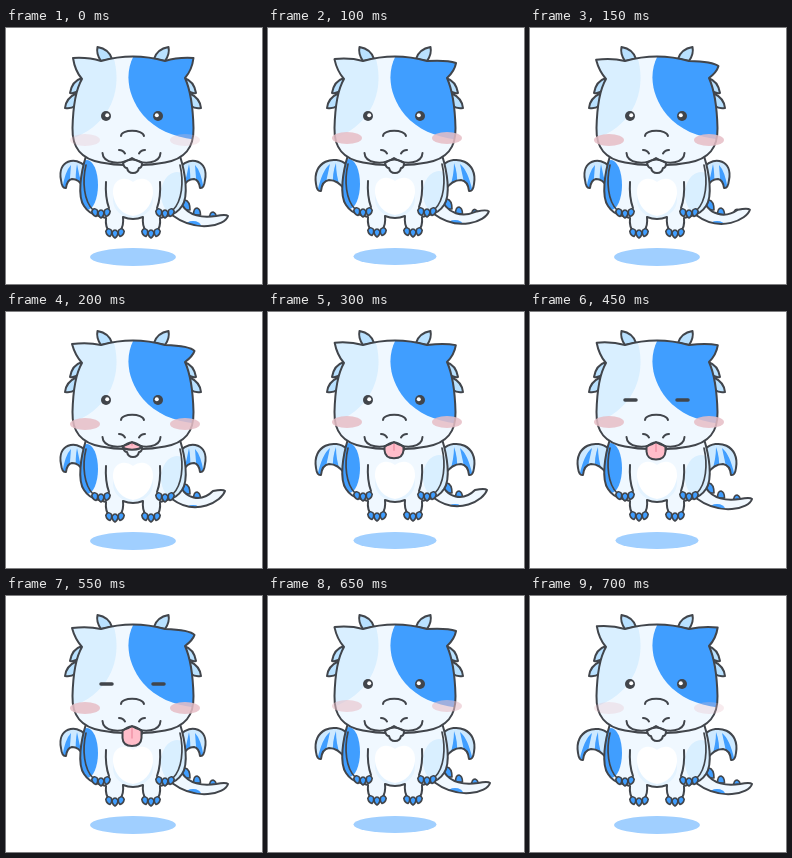
Animation of 256x256 px, one loop 0.75 s. Source, as an HTML page with a canvas:

```html
<!DOCTYPE html>
<html lang="en">
<head>
<meta charset="utf-8">
<style>
html, body { margin: 0; width: 100%; height: 100%; overflow: hidden; background: #fff; }
canvas { display: block; width: 256px; height: 256px; }
</style>
</head>
<body>
<canvas id="stage"></canvas>
<script>
const canvas = document.getElementById('stage');
const ctx = canvas.getContext('2d');
const ratio = window.devicePixelRatio || 1;
canvas.width = canvas.height = 256 * ratio;

const INK = '#41454b', BLUE = '#409eff', SKY = '#b9e1ff', MEMBRANE = '#cde9ff';
const PALE = '#d9efff', SKIN = '#f0f8ff', BLUSH = '#e6bdc6';
const STEP = 50, STEPS = 15, MIDDLE = 127;
const FLAPS = 4, NODS = 2;

// Each track is a list of [step, value] pairs joined by straight lines.
const tracks = {
  tail: [[0, 0], [2, .4], [4, 1], [6, 1], [8, 0], [15, 0]],
  tongue: [[0, 0], [3, 0], [4, .35], [6, .8], [8, .8], [11, 1], [13, 0], [15, 0]],
  blush: [[0, .35], [2, 1], [12, 1], [14, .35], [15, .35]]
};

const mix = (a, b, k) => a + (b - a) * k;

function sample(track, step) {
  const i = track.findIndex(key => key[0] > step);
  const [s0, v0] = track[i - 1], [s1, v1] = track[i];
  return mix(v0, v1, (step - s0) / (s1 - s0));
}

function poseAt(step) {
  const pose = {};
  for (const name in tracks) pose[name] = sample(tracks[name], step);
  const flap = step * FLAPS / STEPS % 1;
  pose.wing = flap > .1 && flap < .8 ? 1 : 0;
  pose.lift = flap > .1 && flap < .68 ? 1 : 0;
  pose.ear = (1 - Math.cos(2 * Math.PI * NODS * step / STEPS)) / 2;
  pose.closed = step >= 8 && step <= 12;
  return pose;
}

function shape(d, fill, line, width = 2) {
  const path = new Path2D(d);
  if (fill) { ctx.fillStyle = fill; ctx.fill(path); }
  if (line) { ctx.strokeStyle = line; ctx.lineWidth = width; ctx.stroke(path); }
}

function oval(x, y, rx, ry, fill) {
  ctx.beginPath();
  ctx.ellipse(x, y, rx, ry, 0, 0, Math.PI * 2);
  ctx.fillStyle = fill;
  ctx.fill();
}

function group(draw) {
  ctx.save();
  draw();
  ctx.restore();
}

function bothSides(draw) {
  draw();
  group(() => {
    ctx.translate(MIDDLE * 2, 0);
    ctx.scale(-1, 1);
    draw();
  });
}

function painted(d, fill, patches) {
  group(() => {
    ctx.clip(new Path2D(d));
    shape(d, fill);
    patches();
  });
  shape(d, null, INK);
}

function drawWing(open) {
  const m = (a, b) => mix(a, b, open);
  const tipX = m(60, 53), tipY = m(160, 164), foldX = m(66, 61), foldY = m(151, 153);
  const d = `M79 138 C${m(70, 67)} ${m(128, 127)} ${m(51, 44)} ${m(132, 134)} ${m(55, 48)} ${m(152, 157)}
    Q${m(56, 49)} ${tipY + 1} ${tipX} ${tipY}
    Q${tipX + 1} ${foldY + 1} ${foldX} ${foldY} Q${m(73, 70)} ${m(151, 153)} 77 ${m(159, 163)} L84 148 Z`;
  painted(d, MEMBRANE, () => {
    const top = m(67, 64);
    shape(`M${top - 2} 137 Q${foldX - 7} 143 ${tipX - 4} ${tipY + 2} H${tipX + 3} Q${foldX - 2} 150 ${top - 2} 137 Z`, BLUE);
    shape(`M${top + 4} 136 Q${foldX + 3} 146 ${foldX + 4} 160 H${foldX + 11} Q${foldX + 7} 148 ${top + 4} 136 Z`, BLUE);
  });
}

function drawTail(bend) {
  const x = mix(222, 219, bend), y = mix(188, 179, bend);
  const spike = (sx, sy, size) =>
    shape(`M${sx - size} ${sy + size * 2} Q${sx - size} ${sy} ${sx} ${sy}
      Q${sx + size} ${sy + 1} ${sx + size} ${sy + size * 2} Z`, BLUE, INK, 1.6);
  spike(179, 172, 5);
  spike(191, 180, 3.5);
  spike(207, mix(184, 180, bend), 3.5);
  const d = `M172 168 C178 189 196 190 ${x - 12} ${y} Q${x - 2} ${y - 2} ${x} ${y}
    C${x - 3} ${y + 10} 190 205 166 187 Z`;
  painted(d, SKIN, () => oval(187, 198, 8, 5, BLUE));
}

function drawClaws(x, y) {
  for (const side of [-1, 1, 0]) {
    group(() => {
      ctx.translate(x + side * 5, y - Math.abs(side) * 1.5);
      ctx.rotate(side * .25);
      shape('M-2.8 -6 Q-3.2 -2 0 0 Q3.2 -2 2.8 -6 Q0 -10 -2.8 -6 Z', BLUE, INK, 1.6);
    });
  }
}

function drawBody() {
  const d = `M80 128 C75 144 71 168 78 178 Q83 186 93 188 L100 190
    Q99 200 104 204 Q110 207 114 203 Q118 198 117 189
    Q127 193 137 189 Q136 198 140 203 Q144 207 150 204 Q155 200 154 190
    L161 188 Q171 186 176 178 C183 168 179 144 174 128 Z`;
  painted(d, SKIN, () => {
    oval(81, 157, 11, 25, BLUE);
    oval(171, 166, 16, 22, PALE);
    oval(127, 172, 20, 18, '#e4f3ff');
    shape('M127 154 C117 147 106 152 107 166 Q110 185 127 188 Q144 185 147 166 C148 152 137 147 127 154 Z', '#fff');
  });
  bothSides(() => {
    shape('M80 137 C76 154 78 173 87 182', null, INK, 1.7);
    shape('M100 154 Q99 169 103 180', null, INK);
    drawClaws(109, 210);
    drawClaws(95, 190);
  });
}

function drawHead(pose) {
  bothSides(() => {
    shape('M95 33 Q90 26 91.5 19 Q103 21 106 31 Z', SKY, INK);
    shape('M76 50 Q66 53 64 65 Q69 66 73 62 Z', SKY, INK);
    shape('M71 65 Q60 70 59 80 Q65 81 69 78 Z', SKY, INK);
  });
  const droop = (up, down) => mix(up, down, pose.ear);
  const lx = droop(67, 66), ly = droop(30, 32);
  const rx = droop(187.5, 188.5), ry = droop(30, 39);
  const d = `M${lx} ${ly} Q82 ${droop(29, 30)} 95 33 Q127 24 159 33
    Q${droop(172, 184)} ${droop(29, 34)} ${rx} ${ry}
    Q${droop(186, 187)} ${droop(42, 44)} 179 50 C184 61 187 80 187.5 100 C188 120 179 131 159 134.5
    Q145 137 136 137 H118 Q109 137 95 134.5 C75 131 66 120 66.5 100
    C67 80 70 61 76 51 Q69 43 ${lx} ${ly} Z`;
  painted(d, SKIN, () => {
    shape('M60 20 H104 C118 50 112 96 62 112 Z', PALE);
    shape('M131 22 C117 43 121 67 137 87 C151 103 170 110 194 112 V22 Z', BLUE);
  });
}

function drawFace(pose) {
  const cheekY = 112 - 2 * pose.lift;
  group(() => {
    ctx.globalAlpha = pose.blush * .85;
    oval(79, cheekY, 15, 6, BLUSH);
    oval(179, cheekY, 15, 6, BLUSH);
  });
  for (const side of [-1, 1]) {
    const x = 126 + side * 26;
    if (pose.closed) {
      shape(`M${x - 5} 88 H${x + 6}`, null, INK, 3.5);
    } else {
      oval(x, 88, 5, 5, INK);
      oval(x - side * 1.2, 87.2, 2, 2, '#fff');
    }
  }
  shape('M115 108 C115 101 137 101 138 108', null, INK);
  shape('M113 122 Q117 122 119 125.5 M133 125.5 Q135 122 139 122', null, INK);

  shape('M117 135 Q118 140 121 140 Q122 145 127 145 Q132 145 133 140 Q136 140 136 135 Q126 128 117 135 Z', SKIN, INK);
  if (pose.tongue > 0) {
    const end = mix(131, 150, pose.tongue);
    const corner = Math.min(8, end - 134);
    shape(`M116.5 135 Q126 126 135.5 135 V${end - corner} Q135 ${end} 126 ${end} Q117 ${end} 116.5 ${end - corner} Z`,
      '#ffbdca', INK);
    shape(`M126 132 V${Math.max(133, end - 8)}`, null, '#ef8ea3', 1.3);
  }
  shape('M96.5 125 C97 135 114 138 126 130 C138 138 154 135 154.5 125', null, INK);
}

function draw(pose) {
  const { lift } = pose;
  ctx.setTransform(ratio, 0, 0, ratio, 0, 0);
  ctx.fillStyle = '#fff';
  ctx.fillRect(0, 0, 256, 256);
  ctx.lineCap = ctx.lineJoin = 'round';

  oval(127, 229 - lift * .5, 43 - lift * 1.5, 9 - lift * .5, '#a0cfff');
  group(() => {
    ctx.translate(0, -lift);
    drawTail(pose.tail);
    bothSides(() => drawWing(pose.wing));
    drawBody();
  });
  drawHead(pose);
  drawFace(pose);
}

function tick() {
  draw(poseAt(Math.floor(performance.now() / STEP) % STEPS));
  requestAnimationFrame(tick);
}
tick();
</script>
</body>
</html>
```
